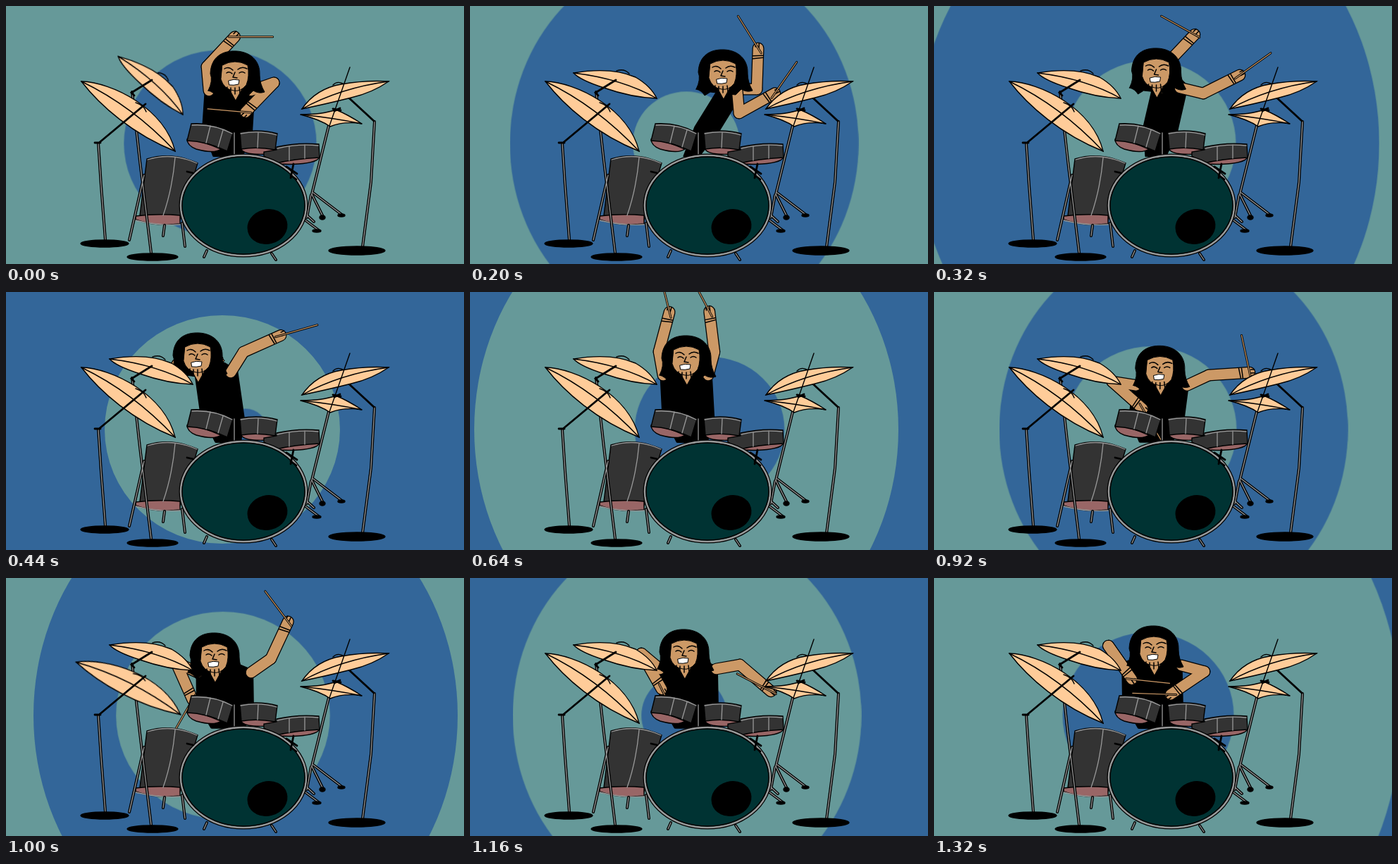
An HTML page without scripts for the animation above (1.36 s loop, 650 by 366 pixels).

```html
<!DOCTYPE html>
<html lang="en">
<head>
<meta charset="utf-8">
<title>Drummer</title>
<style>
html, body { margin: 0; width: 100%; height: 100%; overflow: hidden; background: #369; }
svg { position: absolute; left: 0; top: 0; width: 650px; height: 366px; }

/* Every ripple follows one growth rule; younger ripples lie on top */
.ripples { position: absolute; inset: 0; overflow: hidden; isolation: isolate; }
.ripples i {
  position: absolute; left: var(--x); top: 195px; width: 200px; height: 200px; margin: -100px;
  border-radius: 50%; background: #699;
  animation: grow 1.36s var(--start) infinite;
}
.ripples .blue { background: #369; }
@keyframes grow {
  0% { transform: scale(0); z-index: 34; animation-timing-function: steps(11) }
  32.35% { transform: scale(1.67, 1.62); z-index: 23; animation-timing-function: steps(10) }
  61.76% { transform: scale(4.35, 5.2); z-index: 13; animation-timing-function: steps(13) }
  100% { transform: scale(5, 6); z-index: 0 }
}

/* Drummer: a jointed figure, all angles measured on the stage */
@property --headX { syntax: "<number>"; inherits: true; initial-value: 0 }
@property --headY { syntax: "<number>"; inherits: true; initial-value: 0 }
@property --chestX { syntax: "<number>"; inherits: true; initial-value: 0 }
@property --span { syntax: "<number>"; inherits: true; initial-value: 0 }
@property --upperL { syntax: "<number>"; inherits: true; initial-value: 0 }
@property --foreL { syntax: "<number>"; inherits: true; initial-value: 0 }
@property --stickL { syntax: "<number>"; inherits: true; initial-value: 0 }
@property --upperR { syntax: "<number>"; inherits: true; initial-value: 0 }
@property --foreR { syntax: "<number>"; inherits: true; initial-value: 0 }
@property --stickR { syntax: "<number>"; inherits: true; initial-value: 0 }
@keyframes drum {
  0% { --headX: 325; --headY: 98; --chestX: 318; --span: 30; --upperL: -95; --foreL: -47; --stickL: 0; --upperR: -19; --foreR: 134; --stickR: -175; animation-timing-function: steps(5) }
  14.7% { --headX: 359; --headY: 96; --chestX: 376; --span: 3; --upperL: 0; --foreL: -88; --stickL: -122; --upperR: 85; --foreR: -29; --stickR: -55; animation-timing-function: steps(6) }
  32.35% { --headX: 272; --headY: 92; --chestX: 297; --span: 22; --upperL: -160; --foreL: -5; --stickL: -180; --upperR: -58; --foreR: -24; --stickR: -16; animation-timing-function: steps(5) }
  47.05% { --headX: 307; --headY: 96; --chestX: 306; --span: 32; --upperL: -100; --foreL: -75; --stickL: -104; --upperR: -75; --foreR: -97; --stickR: -118; animation-timing-function: steps(4) }
  58.82% { --headX: 358; --headY: 108; --chestX: 342; --span: 34; --upperL: -195; --foreL: 5; --stickL: -31; --upperR: -10; --foreR: 88; --stickR: -65; animation-timing-function: steps(5) }
  73.52% { --headX: 296; --headY: 112; --chestX: 310; --span: 38; --upperL: -155; --foreL: 66; --stickL: 120; --upperR: -35; --foreR: -65; --stickR: -127; animation-timing-function: steps(8) }
  97.05%, 100% { --headX: 312; --headY: 102; --chestX: 309; --span: 42; --upperL: -125; --foreL: 55; --stickL: 6; --upperR: 15; --foreR: 146; --stickR: -178 }
}
.drummer { animation: drum 1.36s infinite; stroke: #000; stroke-linejoin: round; stroke-linecap: round; }
.torso {
  transform: translate(315px, 212px)
    matrix(calc(.5 + var(--span) / 60), 0, calc((315 - var(--chestX)) / 100), calc((198 - var(--headY)) / 100), 0, 0);
}
.head { transform: translate(calc(var(--headX) * 1px), calc(var(--headY) * 1px)); }
.left { --side: -1; --upper: var(--upperL); --fore: var(--foreL); --stick: var(--stickL); }
.right { --side: 1; --upper: var(--upperR); --fore: var(--foreR); --stick: var(--stickR); }
.shoulder {
  transform: translate(calc((var(--chestX) + var(--side) * var(--span)) * 1px), calc((var(--headY) + 22) * 1px))
    rotate(calc(var(--upper) * 1deg));
}
.elbow { transform: translate(34px, 0) rotate(calc((var(--fore) - var(--upper)) * 1deg)); }
.hand { transform: translate(58px, 0) rotate(calc((var(--stick) - var(--fore)) * 1deg)); }
.edge { stroke-width: 17; }
.flesh { stroke: #c96; stroke-width: 14.5; }
.skin { fill: #c96; }
.wood { stroke: #c96; stroke-width: 1.2; }
.ink { fill: none; stroke-width: 1.5; }

/* Kit */
.kit { stroke: #000; stroke-width: 1.4; stroke-linecap: round; fill: none; }
.brass { fill: #fc9; }
.shell { fill: #333; }
.base { fill: #966; }
.solid { fill: #000; }
.tube { stroke-width: 4; }
.chrome { stroke: #999; stroke-width: 1.3; }
.rod { stroke-width: 2.8; }
.crash { animation: crash 1.36s steps(2) infinite; transform-origin: 206px 111px; }
.ride { animation: ride 1.36s steps(2) infinite; transform-origin: 174px 156px; }
@keyframes crash { 0% { transform: rotate(25deg) } 6% { transform: rotate(-5deg) } 12% { transform: rotate(2deg) } 14.7%, 100% { transform: none } }
@keyframes ride { 0%, 67% { transform: none } 73.52% { transform: rotate(-10deg) } 79% { transform: rotate(4deg) } 83%, 100% { transform: none } }
</style>
</head>
<body>
<div class="ripples">
  <i style="--x: 307px; --start: 0s"></i>
  <i class="blue" style="--x: 340px; --start: -1s"></i>
  <i style="--x: 308px; --start: -.76s"></i>
  <i class="blue" style="--x: 304px; --start: -.36s"></i>
</div>
<svg viewBox="0 0 650 366">
  <defs>
    <path id="poles" d="M131 195L135 255L141 332M179 122L190 220L206 350M523 164L518 250L506 342M458 170L434 267L450 299M436 265L478 297M433 268L427 300M196 240L175 332M225 311L223 326M250 308L254 341M285 347L281 356M377 351L383 360M425 295L437 306M425 304L445 319M324 180V212"/>
    <g id="arm">
      <g class="shoulder">
        <path class="edge" d="M0 0H34"/>
        <g class="elbow">
          <path class="edge" d="M0 0H58"/>
          <path class="flesh" d="M0 0H58"/>
          <path class="ink" d="M43-7L45 7M47-7L48 7M60-4H65M59 1H65"/>
          <g class="hand">
            <path stroke-width="3" d="M-8 0H54"/>
            <path class="wood" d="M-8 0H54"/>
          </g>
        </g>
        <path class="flesh" d="M0 0H34"/>
      </g>
    </g>
  </defs>

  <g class="drummer">
    <path class="torso" stroke-width="4" d="M-34-94L-14-104H16L34-94L32-32L20 0H-20L-36-40Z"/>
    <use href="#arm" class="left"/>
    <use href="#arm" class="right"/>
    <g class="head">
      <path d="M-38 22Q-31 8-35-2C-34-26-18-35 2-34S36-20 35 0Q35 12 42 24Q34 27 26 22L18 30L-18 26L-26 31Q-30 24-38 22Z"/>
      <path class="skin" d="M-9 18H11L1 36Z"/>
      <path class="skin" d="M-18-14Q0-24 18-14Q21 2 16 14Q8 24-2 22Q-16 20-20 6Z"/>
      <path class="ink" d="M-15-9Q-9-13-3-7M4-8Q10-13 17-9M-12-3Q-8-6-4-2M6-3Q10-6 14-3M0-4L-3 3L3 4M-11 17L-12 24M-6 18V26M0 18V27M6 17L7 26"/>
      <path fill="#fff" d="M-9 8Q-2 5 6 7L5 13Q-2 15-8 14Z"/>
    </g>
  </g>

  <g class="kit">
    <!-- floor tom -->
    <path class="shell" d="M200 217Q235 206 272 223L247 304Q215 309 190 297Z"/>
    <path class="base" d="M184 298Q216 294 247 297V309Q212 313 184 303Z"/>
    <path class="chrome" d="M201 218Q235 207 271 223M240 215Q236 260 223 297M184 304Q216 312 247 310"/>

    <use href="#poles" class="tube"/><use href="#poles" class="chrome"/>

    <!-- rack toms -->
    <path class="base" d="M257 189Q278 191 305 203Q295 210 270 203Q257 198 257 189Z"/>
    <path class="shell" d="M263 167Q295 165 322 180L314 206Q285 192 257 191Z"/>
    <path class="base" d="M333 202Q360 198 383 203Q380 212 352 210Q336 209 333 202Z"/>
    <path class="shell" d="M332 179Q360 174 385 181L382 204Q356 199 334 203Z"/>
    <path class="base" d="M372 221Q410 214 445 214Q443 222 415 224Q388 226 372 221Z"/>
    <path class="shell" d="M384 200Q415 193 444 196L445 215Q408 217 384 223L366 213V207L384 204Z"/>
    <path class="chrome" d="M264 169Q295 167 321 181M290 170L284 194M308 176L301 200M333 181Q360 176 384 183M358 179L357 201M385 202Q415 195 443 198M402 199V219M424 197V216"/>

    <!-- bass drum -->
    <ellipse cx="337" cy="283" rx="89" ry="71" stroke-width="5"/>
    <ellipse cx="337" cy="283" rx="89" ry="71" fill="#033" stroke="#999" stroke-width="2.5"/>
    <ellipse cx="337" cy="283" rx="87" ry="69"/>
    <ellipse class="solid" cx="371" cy="313" rx="28" ry="24" transform="rotate(-15 371 313)"/>
    <path class="rod" d="M398 228L413 238M408 224L404 244M404 240L412 246M257 235L266 237"/>

    <!-- stand feet -->
    <g class="solid">
      <ellipse cx="140" cy="337" rx="34" ry="5"/>
      <ellipse cx="208" cy="356" rx="36" ry="5"/>
      <ellipse cx="498" cy="347" rx="40" ry="6"/>
      <ellipse cx="449" cy="300" rx="4" ry="3"/>
      <ellipse cx="476" cy="297" rx="5" ry="2"/>
      <ellipse cx="441" cy="319" rx="6" ry="2"/>
    </g>

    <!-- cymbals -->
    <g class="ride">
      <path class="brass" d="M107 107C150 108 225 145 240 206C180 182 134 142 107 107Z"/>
      <path d="M107 107Q180 142 240 206M184 137Q196 141 199 150"/>
    </g>
    <g class="crash">
      <path class="brass" d="M147 95Q200 86 235 101Q257 114 265 131Q230 130 190 116Q156 105 147 95Z"/>
      <path d="M147 95Q215 103 265 131M208 92Q219 88 226 96"/>
    </g>
    <path class="rod" d="M198 139L132 194M126 194H134M207 105L178 123L182 127M477 111L483 127L522 163"/>
    <path class="brass" d="M420 146Q440 117 476 111Q510 105 543 107Q520 123 490 130Q450 140 420 146Z"/>
    <path d="M420 146Q475 116 543 107M464 112Q470 106 478 110"/>
    <path class="brass" d="M418 154Q450 154 468 147Q485 154 505 167Q480 163 460 171Q446 161 418 154Z"/>
    <path d="M418 154Q460 158 505 167M488 87L459 170"/>
    <path class="rod" d="M464 146L475 148M466 149L474 145"/>
  </g>
</svg>
</body>
</html>
```
